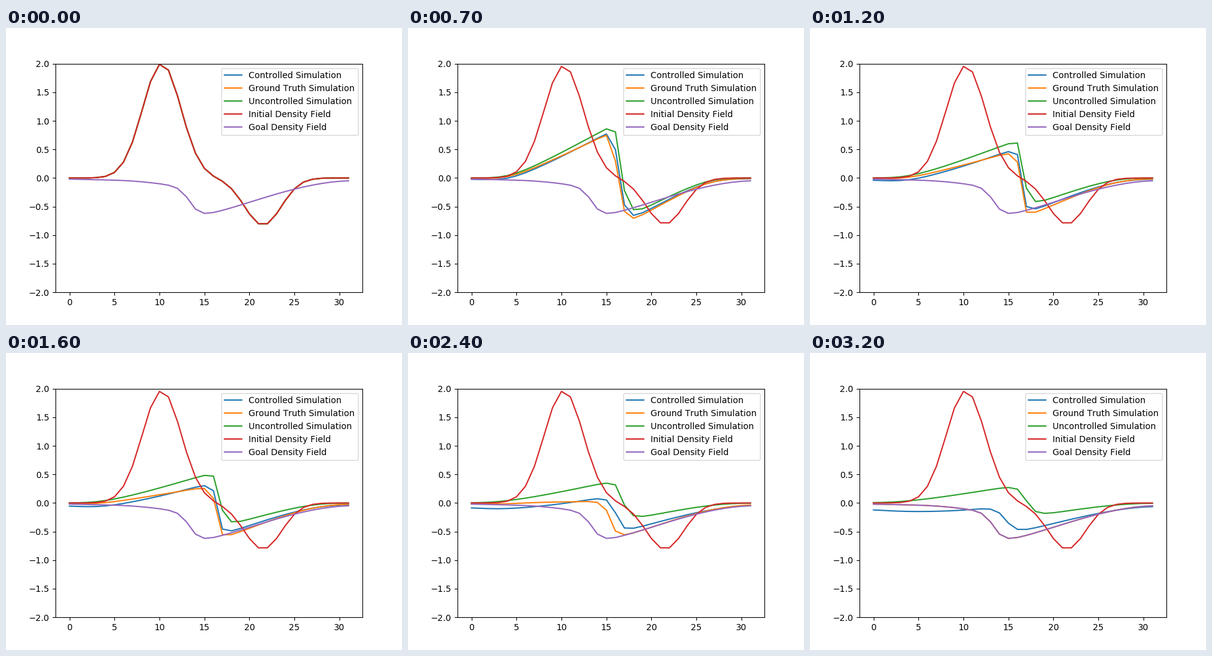
Recreate the animation shown at these times as a matplotlib script. Size 640 px wide and 480 px high, loop 3300 ms.

```python
import numpy as np
import matplotlib.pyplot as plt
from matplotlib.animation import FuncAnimation

# Burgers' equation on a line of cells, in units of cells and frames
CELLS, STEPS = 32, 32
DT = 0.96
VISCOSITY = 0.092
SUBSTEPS = 8
x = np.arange(CELLS)


def gauss(amp, center, sigma):
    return amp * np.exp(-0.5 * ((x - center) / sigma) ** 2)


def diffuse(u):
    for _ in range(SUBSTEPS):
        p = np.pad(u, 1, mode="edge")
        u = u + VISCOSITY / SUBSTEPS * (p[:-2] - 2 * u + p[2:])
    return u


def advect(u):
    """Semi-Lagrangian step: look up each cell's value upstream."""
    return np.interp(x - DT * u, x, u)


def simulate(u, force=0):
    states = [u]
    for _ in range(STEPS):
        u = advect(diffuse(u)) + force
        states.append(u)
    return states


start = gauss(2.003, 10.26, 2.14) + gauss(-0.824, 21.5, 2.04)
truth = simulate(start, gauss(-0.0253, 16.2, 5.8))
controlled = simulate(start, gauss(-0.0175, 14.2, 7.6))

curves = {
    "Controlled Simulation": controlled,
    "Ground Truth Simulation": truth,
    "Uncontrolled Simulation": simulate(start),
    # smoothed once, by the first diffusion step
    "Initial Density Field": [start] + [diffuse(start)] * STEPS,
    "Goal Density Field": [truth[-1]] * (STEPS + 1),
}

plt.rcParams["text.kerning_factor"] = 6
fig, ax = plt.subplots(figsize=(6.4, 4.8), dpi=100)
lines = [ax.plot(x, states[0], label=name)[0] for name, states in curves.items()]
ax.set_ylim(-2, 2)
ax.legend(loc="upper right")


def update(step):
    for line, states in zip(lines, curves.values()):
        line.set_ydata(states[step])
    return lines


anim = FuncAnimation(fig, update, frames=STEPS + 1, interval=100,
                     repeat=True, repeat_delay=0)
plt.show()
```
